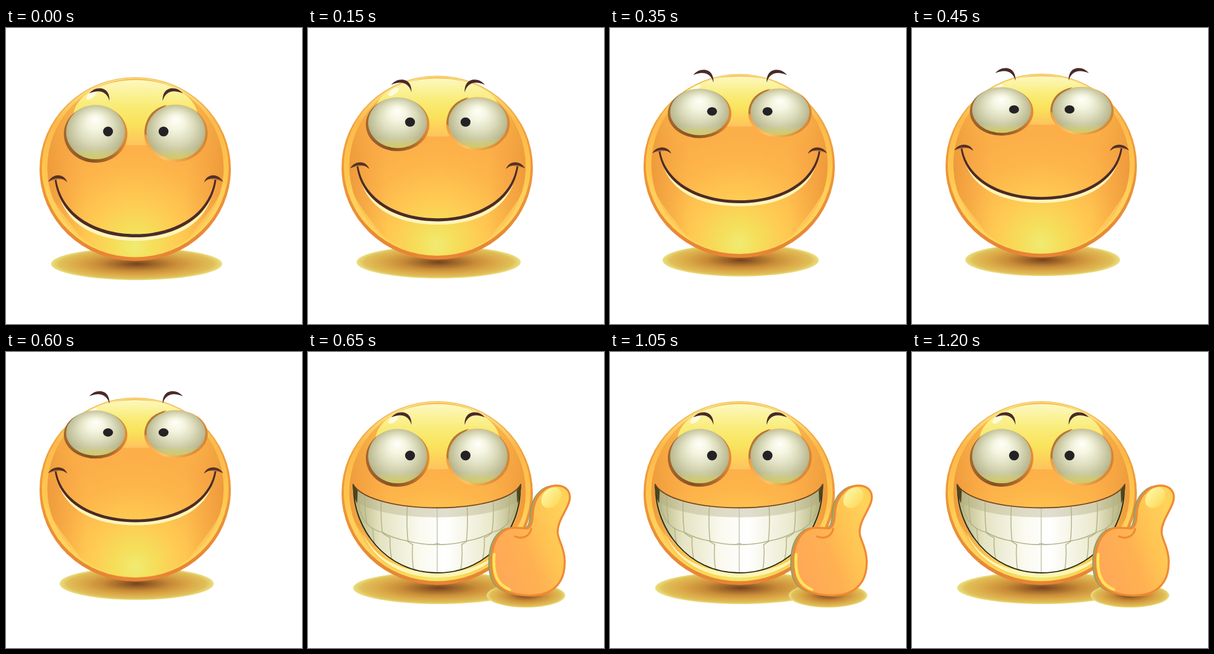
Write an HTML page that moves like this. It is 512x512 px and loops after 1.45 s.

```html
<!DOCTYPE html>
<html lang="en">
<head>
<meta charset="utf-8">
<title>Grinning ball</title>
<style>
html, body { margin: 0; width: 100%; height: 100%; overflow: hidden; background: #fff; }
svg { display: block; width: 100vw; height: 100vh; }
.line { fill: none; stroke-linecap: round; stroke-linejoin: round; }
</style>
</head>
<body>
<svg viewBox="0 0 512 512">
  <defs>
    <radialGradient id="shade">
      <stop offset="0" stop-color="#75421f"/><stop offset=".2" stop-color="#9c6428"/>
      <stop offset=".45" stop-color="#c98c38"/><stop offset=".7" stop-color="#dba948"/>
      <stop offset=".9" stop-color="#e0bf58"/><stop offset="1" stop-color="#ebdf80"/>
    </radialGradient>
    <linearGradient id="rim" x2="0" y2="1">
      <stop offset="0" stop-color="#efc463"/><stop offset=".3" stop-color="#f0a03e"/>
      <stop offset="1" stop-color="#e78434"/>
    </linearGradient>
    <linearGradient id="band" x2="0" y2="1">
      <stop offset="0" stop-color="#fbec90"/><stop offset=".25" stop-color="#fdb94a"/>
      <stop offset=".6" stop-color="#ffc950"/><stop offset="1" stop-color="#f9d95a"/>
    </linearGradient>
    <radialGradient id="skin" gradientUnits="userSpaceOnUse" cx="223" cy="378" r="285">
      <stop offset="0" stop-color="#f0eb72"/><stop offset=".12" stop-color="#f5de5a"/>
      <stop offset=".28" stop-color="#ffca52"/><stop offset=".5" stop-color="#fdb54a"/>
      <stop offset=".68" stop-color="#fcae48"/><stop offset="1" stop-color="#fbb94b"/>
    </radialGradient>
    <linearGradient id="sides">
      <stop offset="0" stop-color="#e0862f" stop-opacity=".5"/><stop offset=".22" stop-color="#f09a3c" stop-opacity="0"/>
      <stop offset=".78" stop-color="#f09a3c" stop-opacity="0"/><stop offset="1" stop-color="#e0862f" stop-opacity=".5"/>
    </linearGradient>
    <linearGradient id="brow" x2="0" y2="1">
      <stop offset="0" stop-color="#fdf8c0"/><stop offset=".16" stop-color="#fbf3a0"/>
      <stop offset=".4" stop-color="#f9eb74"/><stop offset=".65" stop-color="#fae35c"/>
      <stop offset=".86" stop-color="#fdd05a"/><stop offset="1" stop-color="#fcc360"/>
    </linearGradient>
    <radialGradient id="ball" cx=".5" cy=".5" r=".58" fx=".5" fy=".26">
      <stop offset="0" stop-color="#fffffa"/><stop offset=".25" stop-color="#f4f5e0"/>
      <stop offset=".55" stop-color="#dadaba"/><stop offset=".82" stop-color="#bdbc94"/>
      <stop offset="1" stop-color="#a5a374"/>
    </radialGradient>
    <linearGradient id="glow" x2="0" y2="1">
      <stop offset=".8" stop-color="#e3dd72" stop-opacity="0"/><stop offset="1" stop-color="#d9d15c" stop-opacity=".85"/>
    </linearGradient>
    <linearGradient id="socketL">
      <stop offset="0" stop-color="#a5672c"/><stop offset=".4" stop-color="#865025"/>
      <stop offset=".75" stop-color="#b06a2a"/><stop offset="1" stop-color="#e98d35"/>
    </linearGradient>
    <linearGradient id="socketR" x2="1" y2=".4">
      <stop offset="0" stop-color="#d38431"/><stop offset=".3" stop-color="#f6a748"/>
      <stop offset=".6" stop-color="#fdc468"/><stop offset="1" stop-color="#dc8a36"/>
    </linearGradient>
    <linearGradient id="teeth">
      <stop offset="0" stop-color="#b2b078"/><stop offset=".16" stop-color="#e4e3c2"/>
      <stop offset=".4" stop-color="#fafaf0"/><stop offset=".55" stop-color="#fff"/>
      <stop offset=".82" stop-color="#eae9cc"/><stop offset="1" stop-color="#aeac72"/>
    </linearGradient>
    <linearGradient id="palm" x1=".1" y1=".75" x2=".95" y2=".3">
      <stop offset="0" stop-color="#ffa957"/><stop offset=".4" stop-color="#ffb152"/>
      <stop offset=".65" stop-color="#ffc252"/><stop offset="1" stop-color="#ffd25a"/>
    </linearGradient>
    <linearGradient id="nail" x2="0" y2="1">
      <stop offset="0" stop-color="#fdf6a0"/><stop offset="1" stop-color="#fddb60"/>
    </linearGradient>
    <clipPath id="inBall"><ellipse cx="223.5" cy="241.5" rx="160" ry="154"/></clipPath>
    <clipPath id="inMouth"><use href="#lips"/></clipPath>
    <path id="lips" d="M78 229C110 283 338 283 368 229C372 300 318 382 224 382C128 382 74 300 78 229Z"/>
    <path id="hand" d="M380 305C391 299 387 281 391 266C396 246 411 232 428 231C446 230 456 242 452 258C448 274 430 294 432 314C434 328 443 337 444 360C445 388 434 408 411 417C387 425 354 421 335 409C318 398 316 374 318 352C320 328 331 310 348 305C360 302 372 306 380 305Z"/>
  </defs>

  <ellipse id="shadow" cx="226" cy="408" rx="148" ry="28" fill="url(#shade)"/>

  <g id="body">
    <ellipse cx="223.5" cy="244" rx="165.5" ry="159" fill="url(#rim)"/>
    <ellipse cx="223.5" cy="241.5" rx="161.5" ry="155" fill="url(#band)"/>
    <ellipse cx="224" cy="241.5" rx="152.5" ry="154" fill="url(#skin)"/>
    <ellipse cx="224" cy="241.5" rx="152.5" ry="154" fill="url(#sides)"/>
    <g fill="#ffd360" opacity=".65">
      <path d="M68 268C72 310 94 345 132 366C112 336 86 312 68 268Z"/>
      <path d="M379 268C375 310 353 345 315 366C335 336 361 312 379 268Z"/>
    </g>
    <g clip-path="url(#inBall)">
      <g id="forehead">
        <path fill="url(#brow)" d="M117 146C125 110 175 90 224 90C275 90 322 110 331 146C331 185 300 203 224 203C150 203 117 185 117 146Z"/>
        <ellipse cx="148" cy="116" rx="11" ry="5" transform="rotate(-40 148 116)" fill="#fffde6" opacity=".9"/>
      </g>
    </g>
  </g>

  <g id="smile">
    <path fill="#fcf6ba" d="M92 290C110 338 165 362 224 362S338 338 356 290C340 345 285 368 224 368S108 345 92 290Z"/>
    <path fill="#4b2b2a" d="M84 261C92 328 155 362 224 362S356 328 364 261L361 261C352 324 290 356.500 224 356.500S96 324 87 261Z"/>
    <g id="corners"></g>
  </g>

  <g id="grin">
    <path fill="#fbf5b4" d="M94 310C116 362 168 382 224 382S332 362 354 310C334 366 280 390 224 390S114 366 94 310Z"/>
    <use href="#lips" fill="url(#teeth)"/>
    <g clip-path="url(#inMouth)">
      <path fill="#a8a578" opacity=".36" d="M74 220H372V250C340 298 108 298 74 250Z"/>
      <g id="gaps" class="line" stroke="#b3b186" stroke-width="1.500"></g>
      <path class="line" stroke="#77733a" stroke-width="5" opacity=".7" d="M78 229C76 258 84 294 104 320M368 229C370 258 362 294 342 320"/>
    </g>
    <path class="line" stroke="#2b2813" stroke-width="1.800" d="M79 238C80 303 132 382 224 382S367 303 367 238"/>
    <path class="line" stroke="#77451f" stroke-width="2" d="M78 229C110 283 338 283 368 229"/>
    <path fill="#4b451f" d="M77 228L86 240L85 262Q77 247 77 228ZM369 228L361 240L362 262Q369 247 369 228Z"/>
  </g>

  <g id="eyes">
    <ellipse cx="155" cy="183.500" rx="55" ry="49.500" fill="url(#socketL)"/>
    <ellipse cx="294" cy="182" rx="55" ry="49.500" fill="url(#socketR)"/>
    <path fill="#b87730" d="M240 183C239 156 255 138 278 133C258 148 248 164 246 188Z"/>
    <path fill="#d18535" d="M330 145C347 161 353 184 342 207Q348 178 330 145Z"/>
    <g id="whites"></g>
  </g>

  <g id="brows" fill="#4a2a28">
    <path d="M144 113C154 100 180 99 179 126C174 109 161 106 144 113Z"/>
    <path d="M306 113C296 100 270 99 271 126C276 109 289 106 306 113Z"/>
  </g>

  <g id="thumb">
    <ellipse cx="377" cy="421" rx="68" ry="21" fill="url(#shade)"/>
    <use href="#hand" x="-5" fill="#a9a262" stroke="#8f8a50"/>
    <use href="#hand" fill="url(#palm)" stroke="#f08a34" stroke-width="3.500"/>
    <path class="line" stroke="#fde45a" stroke-width="5" d="M322 350C319 385 328 403 349 411"/>
    <path class="line" stroke="#f08a34" stroke-width="3.500" d="M358 319C370 324 383 320 386 306"/>
    <ellipse cx="421" cy="252" rx="20" ry="15" transform="rotate(-48 421 252)" fill="url(#nail)"/>
  </g>
</svg>
<script>
const $ = id => document.getElementById(id);
const LOOP = 1450, STEP = 50, RISE = 600, CUT = RISE + STEP;

// Mouth corners, eyeballs and tooth gaps come in mirrored pairs.
const corner = `<path fill="#c57a2c" d="M73 266C81 254 99 254 106 267L104 262Q90 260 73 266Z"/>
  <path fill="#55302a" d="M73 266C80 252 100 250 106 267C97 258 85 258 73 266Z"/>`;
$('corners').innerHTML = `${corner}<g transform="matrix(-1 0 0 1 448.500 0)">${corner}</g>`;

$('whites').innerHTML = [[155, 176.5], [294, 272.5]].map(([x, px]) => `
  <ellipse cx="${x}" cy="180" rx="51" ry="47" fill="url(#ball)"/>
  <ellipse cx="${x}" cy="180" rx="51" ry="47" fill="url(#glow)"/>
  <circle cx="${px}" cy="179" r="8.600" fill="#252226"/>`).join('');

const half = `<path d="M172 262Q170 300 173 327M127 250Q125 290 129 313M99 240Q97 272 102 298M87 236L89 268
  M224 333Q198 334 173 327Q148 323 129 312Q112 308 102 297Q91 285 86 262
  M181 333Q179 360 184 384M142 321Q141 346 147 368M112 305Q113 326 118 344
  M181 333Q174 329 170 326M142 321Q134 318 128 312M112 306L102 297"/>`;
$('gaps').innerHTML = `${half}<g transform="matrix(-1 0 0 1 447 0)">${half}</g>
  <path stroke="#c2c1ac" d="M223.500 268V384M218 333Q223.500 329 229 333"/>`;

// The standard "ease" curve, cubic-bezier(.25, .1, .25, 1).
function ease(x) {
  const curve = (a, b, s) => 3 * a * s * (1 - s) ** 2 + 3 * b * s * s * (1 - s) + s ** 3;
  let lo = 0, hi = 1;
  for (let i = 0; i < 20; i++) {
    const mid = (lo + hi) / 2;
    if (curve(.25, .25, mid) < x) lo = mid; else hi = mid;
  }
  return curve(.1, 1, lo);
}

// Vertical squash plus shift, optional squash across around cx.
function place(id, sy, ty, sx = 1, cx = 0) {
  $(id).setAttribute('transform', `matrix(${sx} 0 0 ${sy} ${cx * (1 - sx)} ${ty})`);
}

function draw(t) {
  const grinning = t >= CUT;
  const p = grinning ? 0 : ease(Math.floor(t / STEP) * STEP / RISE);
  place('shadow', 1, -7.2 * p, 1 - .099 * p, 226);
  place('body', 1, -6.2 * p);
  place('forehead', 1 - .27 * p, 88 * .27 * p);
  place('eyes', 1 - .166 * p, -10 * p);
  place('brows', 1, -36.4 * p);
  place('smile', 1 - .114 * p, -26.3 * p);
  $('smile').style.display = grinning ? 'none' : '';
  $('grin').style.display = $('thumb').style.display = grinning ? '' : 'none';
}

const start = performance.now();
function tick() {
  draw((performance.now() - start) % LOOP);
  requestAnimationFrame(tick);
}
tick();
</script>
</body>
</html>
```
